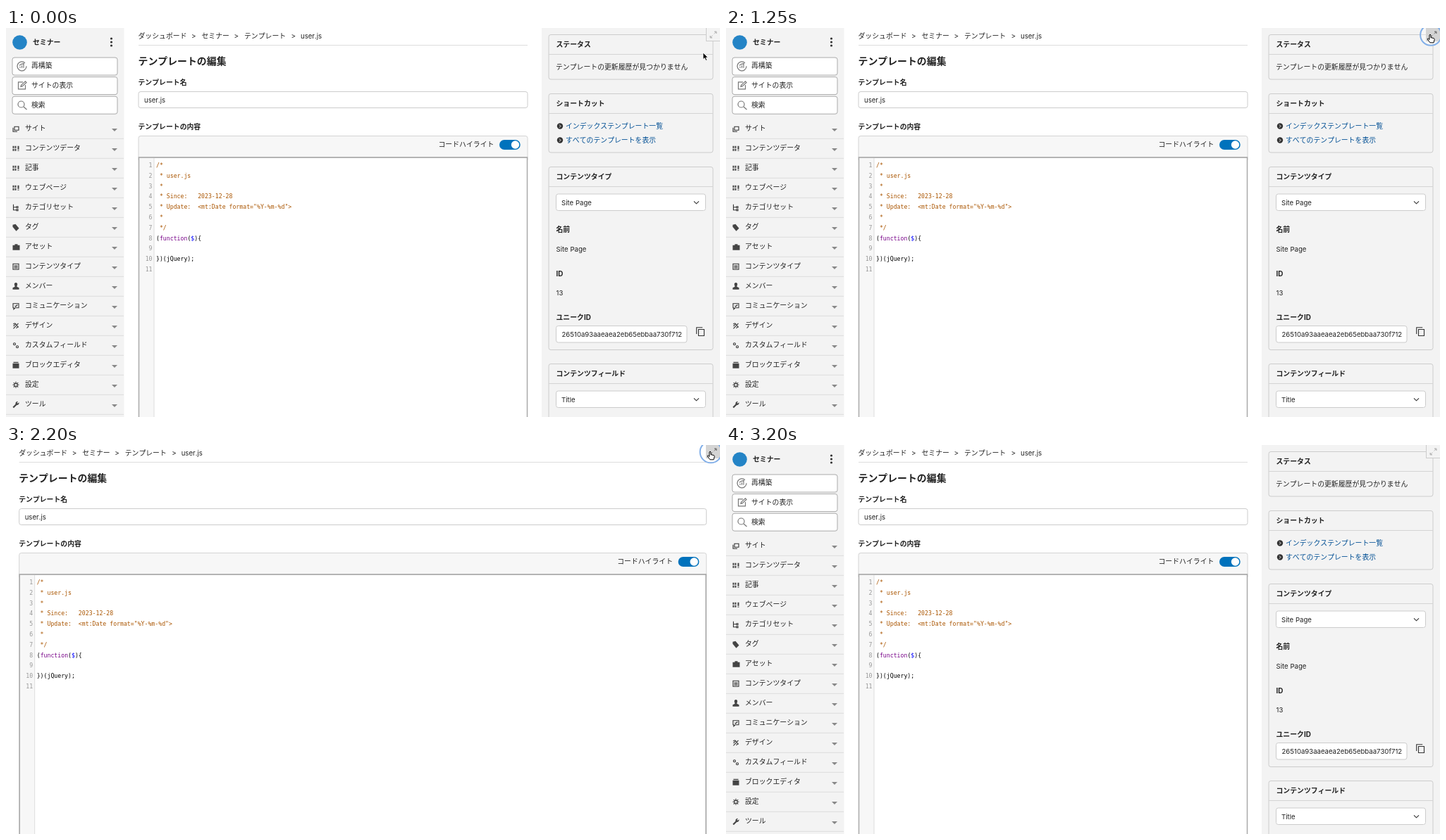
Animation of 1013x553 px, one loop 4150 ms. Source, as an HTML page:

```html
<!DOCTYPE html>
<html lang="ja">
<head>
<meta charset="utf-8">
<style>
html, body { margin: 0; width: 100%; height: 100%; overflow: hidden; background: #fff; }
svg { display: block; }
text { font: 9.87px Inter, "Noto Sans CJK JP", "Noto Sans CJK", sans-serif; font-kerning: none; fill: #222; white-space: pre; }
.latin { font-size: 9.6px; }
.bold { font-weight: 700; }
.title { font-size: 13.9px; font-weight: 700; }
.link { fill: #004f94; }
.code { font: 8.2px "DejaVu Sans Mono", monospace; fill: #000; }
.num { fill: #999; text-anchor: end; }
.comment { fill: #a50; }
.line { fill: none; stroke: #333; stroke-width: 1.1; }
.grey { fill: none; stroke: #777; stroke-width: 1.2; }
</style>
</head>
<body>
<svg id="stage" width="100%" height="100%" viewBox="0 0 1013 553" preserveAspectRatio="none"></svg>
<script>
const text = (x, mid, s, cls = '') =>
  `<text x="${x}" y="${mid + 3.6}" class="${cls}">${s}</text>`;
const rect = (x, y, x2, y2, fill = '#fff', stroke = '#ccc', r = 3) =>
  `<rect x="${x}" y="${y}" width="${x2 - x}" height="${y2 - y}" rx="${r}" fill="${fill}" stroke="${stroke}"/>`;
const rule = (x, x2, y, color = '#d4d4d4') => `<path d="M${x} ${y}H${x2}" stroke="${color}"/>`;
const icon = (x, y, d, cls = 'line') => `<path transform="translate(${x} ${y})" d="${d}" class="${cls}"/>`;

const blocks = 'M0 1h2v3h-2zM3 1h2v3h-2zM7 1h2v5h-2zM0 5h2v3h-2zM3 5h2v3h-2zM7 7h2v1h-2z';
// label, icon path, filled?
const menu = [
  ['サイト', 'M2.5 1.5h6v5h-6zM.5 3v5.5h6'],
  ['コンテンツデータ', blocks, 1],
  ['記事', blocks, 1],
  ['ウェブページ', blocks, 1],
  ['カテゴリセット', 'M1 0v8h4M1 4h4M5.5 3h2v2h-2zM5.5 7h2v2h-2z'],
  ['タグ', 'M0 1l4-1 5 6-4 4-5-6z', 1],
  ['アセット', 'M0 2h3v-1.5h4v1.5h3v7h-10z', 1],
  ['コンテンツタイプ', 'M.5.5h8v8h-8zM2 3h5M2 4.7h5M2 6.5h5'],
  ['メンバー', 'M2.5 2.5a2.2 2.4 0 1 1 4 0l-.7 2.5 3.2 1.5v2.5h-9v-2.5l3.2-1.5z', 1],
  ['コミュニケーション', 'M.5 1h8v6h-5l-2 2v-2h-1zM3 4l1.2 1.2 2.5-2.5'],
  ['デザイン', 'M1 8.5l7-7.500M1 2.500a2 2 0 0 1 3-1l4 5.500M1 5l3-3M5 8l3-3'],
  ['カスタムフィールド', 'M1 2.5a1.5 1.5 0 1 1 3 0a1.5 1.5 0 1 1-3 0M5 6.500a1.5 1.5 0 1 1 3 0a1.5 1.5 0 1 1-3 0'],
  ['ブロックエディタ', 'M0 2h9v7h-9zM1 0h7v1.3h-7z', 1],
  ['設定', 'M2.300 4.500a2.200 2.200 0 1 1 4.400 0a2.200 2.200 0 1 1-4.400 0M4.500 0v2M4.500 7v2M0 4.500h2M7 4.500h2M1.300 1.300l1.500 1.500M6.200 6.200l1.500 1.500M1.300 7.700l1.500-1.500M6.200 2.800l1.500-1.500'],
  ['ツール', 'M0 8l4-4q-.5-3 2.500-4l1 .2-1.500 1.800 1 1 2-1.500q.5 3.500-3.500 4l-4 4z', 1],
];

function sidebar() {
  const buttons = [
    ['再構築', 'M13 7a6.500 6.500 0 1 1-2-4.700M4 9.500v-2M6.500 9.500v-3.500M9 9.500v-5.500M3 6l3-2 4-1'],
    ['サイトの表示', 'M8 2h-6.500v10h10v-6M5 8.500l.5-2 6-5.500 1.500 1.500-6 5.500z'],
    ['検索', 'M10 6a4.500 4.500 0 1 1-9 0a4.500 4.500 0 1 1 9 0M9 9.500l4.500 4'],
  ].map(([label, d], i) => {
    const y = 42 + 27.6 * i;
    return rect(9, y, 158, y + 25, '#fff', '#aaa') + icon(16, y + 5.300, d, 'grey') + text(36, y + 11.8, label);
  });
  const items = menu.map(([label, d, solid], i) => {
    const y = 142.3 + 28 * i;
    return text(27, y, label) + icon(9.500, y - 3.500, d, solid ? '' : 'line') +
      `<path d="M150 ${y + 0.7}h8l-4 4z" fill="#888"/>` + rule(0, 167, y + 15, '#dcdcdc');
  });
  return rect(0, 0, 167.500, 553, '#f3f3f3', 'none', 0) +
    '<circle cx="19.500" cy="20.500" r="10.300" fill="#2484c6"/>' + text(38, 20, 'セミナー', 'bold') +
    [15, 20, 25].map(y => `<circle cx="149.500" cy="${y}" r="1.600" fill="#333"/>`).join('') +
    buttons.join('') + `<g fill="#444">${items.join('')}</g>`;
}

function editor(left, right) {
  const comment = s => `<tspan class="comment">${s}</tspan>`;
  const lines = [
    ...['/*', ' * user.js', ' *', ' * Since:   2023-12-28',
      ' * Update:  &lt;mt:Date format="%Y-%m-%d"&gt;', ' *', ' */'].map(comment),
    '(<tspan fill="#708">function</tspan>(<tspan fill="#00f">$</tspan>){', '', '})(jQuery);', '',
  ];
  const crumbs = [[0, 'ダッシュボード'], [75.500, '&gt;'], [90, 'セミナー'], [136, '&gt;'],
    [150.500, 'テンプレート'], [217, '&gt;'], [230.500, 'user.js', 'latin']];
  return crumbs.map(([x, s, cls]) => text(left + x - 0.500, 11.800, s, cls)).join('') +
    rule(left, right, 24.500, '#ddd') +
    text(left - 0.500, 46.500, 'テンプレートの編集', 'title').replace('50.1', '51.8') +
    text(left - 0.500, 77, 'テンプレート名', 'bold') +
    rect(left, 90.500, right, 113.500) + text(left + 8, 102, 'user.js', 'latin') +
    text(left - 0.500, 140.300, 'テンプレートの内容', 'bold') +
    rect(left, 153.500, right, 190, '#f7f7f7', '#d4d4d4') +
    text(right - 126.500, 165.800, 'コードハイライト') +
    rect(right - 40, 159, right - 10.300, 173, '#0072bc', 'none', 7) +
    `<circle cx="${right - 17.500}" cy="166" r="5.700" fill="#fff"/>` +
    rect(left + 0.500, 184, right - 0.500, 560, '#fff', '#aaa', 0) +
    rect(left + 1, 184.500, left + 22, 560, '#f7f7f7', 'none', 0) +
    `<path d="M${left + 22} 185V553" stroke="#ddd"/>` +
    `<path d="M${left + 0.500} 553V184H${right - 0.500}V553" fill="none" stroke="#aaa" stroke-width="1.500"/>` +
    lines.map((s, i) => {
      const y = 194.300 + 14.800 * i;
      return text(left + 19.500, y, i + 1, 'code num') + text(left + 25, y, s, 'code');
    }).join('');
}

function panel() {
  const card = (y, y2, title) => rect(770, y, 1003, y2, '#f3f3f3') +
    rule(770, 1003, y + 28) + text(780.500, y + 13.800, title, 'bold');
  const select = (y, s) => rect(780.500, y, 992.500, y + 23.500) + text(788, y + 12, s, 'latin') +
    icon(976, y + 10.300, 'M0 0l3.500 3.500 3.500-3.500', 'line');
  const link = (y, s) => `<circle cx="786" cy="${y}" r="4.200" fill="#333"/>` +
    `<path d="M785 ${y - 2}l2 2-2 2" fill="none" stroke="#fff"/>` + text(794, y, s, 'link');
  return rect(760, 0, 1013, 553, '#f3f3f3', 'none', 0) +
    card(9.500, 73, 'ステータス') + text(780, 55, 'テンプレートの更新履歴が見つかりません') +
    card(93.500, 177, 'ショートカット') +
    link(139.500, 'インデックステンプレート一覧') + link(159.500, 'すべてのテンプレートを表示') +
    card(197.500, 457.500, 'コンテンツタイプ') + select(236, 'Site Page') +
    text(780.500, 286.500, '名前', 'bold') + text(780.500, 314.500, 'Site Page', 'latin') +
    text(780.500, 349, 'ID', 'bold') + text(780.500, 376.700, '13', 'latin') +
    text(780.500, 411, 'ユニークID', 'bold') + rect(780.500, 423.500, 966, 447) +
    `<svg x="781" y="424" width="178" height="22">${text(7.500, 11.300, '26510a93aaeaea2eb65ebbaa730f712', 'latin')}</svg>` +
    icon(979, 425, 'M3.500 3.500h8v9h-8zM.7 10v-9.300h8.500', 'line') +
    card(477.500, 570, 'コンテンツフィールド') + select(516, 'Title');
}

const stage = document.getElementById('stage');
stage.innerHTML = `
  <g id="normal">${sidebar()}${editor(188, 740)}${panel()}</g>
  <g id="full">${editor(18.700, 993.700)}</g>
  <g id="expand">
    <rect id="expandBox" x="993.500" y="-1" width="21" height="19.500"/>
    <path id="expandIcon" d="M1004.500 8.500l3-3M1002.500 10.500l-3 3M1005 5h3v3zM999 11v3h3z"/>
  </g>
  <circle id="ring" cx="1000" cy="10" fill="#fff" fill-opacity=".35" stroke="#82afe8" stroke-width="2"/>
  <g id="cursor" stroke-linejoin="round">
    <path id="arrow" d="M0 0v9.600l2.200-2 1.700 3.700 1.700-.8-1.600-3.500h3z" stroke="#fff" stroke-width=".8"/>
    <path id="hand" d="M-1 1q1-1.800 2 0v3.600l4.200 1q1 .4.9 1.900l-1 4.300h-5.200l-3.700-4.700q-.3-1.500 1.300-.9l1.500 1.300z" fill="#fff" stroke="#000"/>
  </g>`;

const el = id => document.getElementById(id);
const show = (id, on) => el(id).setAttribute('display', on ? 'inline' : 'none');
const clamp = v => Math.min(1, Math.max(0, v));
const clicks = [{ start: 1090, grow: 250 }, { start: 2070, grow: 190 }];

function draw(t) {
  const isFull = t >= 1300 && t < 2250;
  show('normal', !isFull);
  show('full', isFull);

  const p = clamp((t - 450) / 500);
  const x = 989 + 10 * (1 - (1 - p) ** 2);
  const y = 35 - 26 * p * p * (3 - 2 * p);
  const hover = y < 19 && t < 2650;
  show('cursor', t < 2650);
  show('arrow', !hover);
  show('hand', hover);
  el('cursor').setAttribute('transform', `translate(${x} ${y})`);

  el('expandBox').setAttribute('fill', hover ? '#bdbdbd' : '#f3f3f3');
  el('expandBox').setAttribute('stroke', hover ? '#bdbdbd' : '#ccc');
  el('expandIcon').setAttribute('fill', hover ? '#333' : '#bbb');
  el('expandIcon').setAttribute('stroke', hover ? '#333' : '#bbb');

  const click = clicks.find(c => t >= c.start && t < c.start + 500);
  show('ring', click);
  if (click) {
    const age = t - click.start;
    el('ring').setAttribute('r', 17 * (1 - (1 - clamp(age / click.grow)) ** 2));
    el('ring').setAttribute('opacity', 1 - clamp((age - 300) / 180));
  }
}

function tick() {
  draw(performance.now() % 4150);
  requestAnimationFrame(tick);
}
tick();
</script>
</body>
</html>
```
